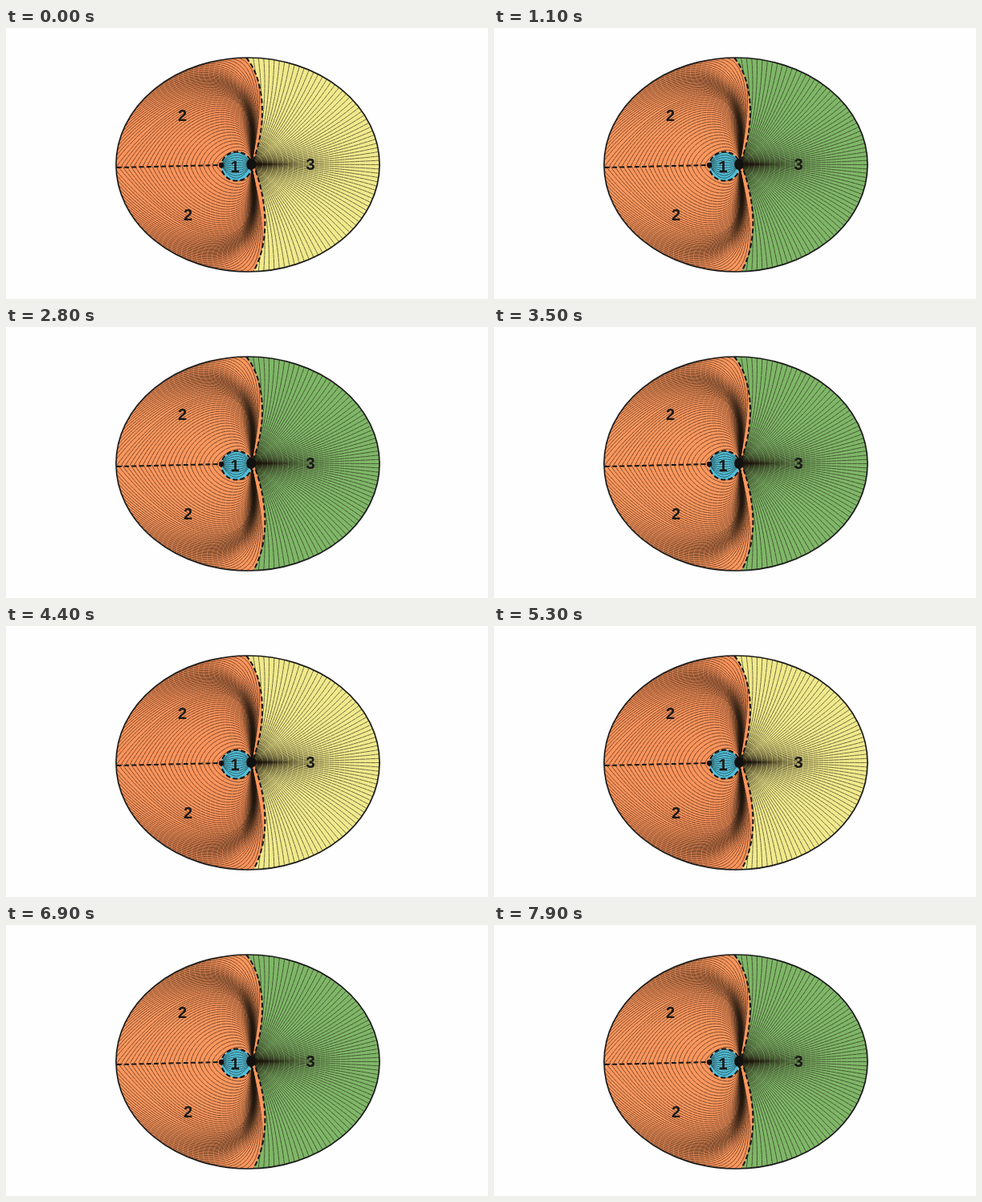
An HTML page for the animation above (8000 ms loop, 600x338 px).

```html
<!DOCTYPE html>
<html lang="en">
<head>
<meta charset="utf-8">
<title>Three flow regions</title>
<style>
  html, body { margin: 0; width: 100%; height: 100%; overflow: hidden; background: #fefefe; }
  svg { display: block; width: 100vw; height: 100vh; }
  path, ellipse { fill: none; }
  .flow { stroke: #20180f; stroke-width: .62; stroke-dasharray: 6 .4; }
  .edge { stroke: #151515; stroke-width: 2; stroke-dasharray: 6 3.2; }
  text { font: bold 20px "Liberation Sans", Arial, sans-serif; fill: #1c1a18; text-anchor: middle; }
</style>
</head>
<body>
<svg viewBox="0 0 600 338">
  <defs>
    <clipPath id="body"><ellipse cx="301" cy="170.5" rx="164" ry="133.5"/></clipPath>
    <clipPath id="left"><path d="M299 30V37C319 60 328 112 307 168C322 205 332 260 308 304V310H130V30Z"/></clipPath>
    <clipPath id="core"><ellipse cx="287" cy="172.5" rx="19" ry="18"/></clipPath>
  </defs>
  <g clip-path="url(#body)">
    <rect id="right" x="130" y="30" width="340" height="280"/>
    <g id="fan" class="flow"></g>
    <g clip-path="url(#left)">
      <rect id="lobes" x="130" y="30" width="200" height="280"/>
      <g id="arches" class="flow"></g>
    </g>
    <path class="edge" d="M299 37C319 60 328 112 307 168C322 205 332 260 308 304"/>
    <path class="edge" d="M138 174L267 171"/>
  </g>
  <g clip-path="url(#core)">
    <rect x="266" y="152" width="42" height="42" fill="#4fbfda"/>
    <g id="lens" class="flow"></g>
  </g>
  <ellipse class="edge" cx="287" cy="172.5" rx="19" ry="18"/>
  <ellipse cx="301" cy="170.5" rx="164" ry="133.5" stroke="#1c1c1c" stroke-width="1.7"/>
  <circle cx="268" cy="171" r="3.2" fill="#111"/>
  <ellipse cx="305" cy="170" rx="5.8" ry="7" style="fill:#111"/>
  <text x="285" y="180">1</text>
  <text x="219.5" y="116">2</text>
  <text x="226.5" y="240">2</text>
  <text x="379" y="176.5">3</text>
</svg>
<script>
const $ = id => document.getElementById(id);
const LOOP = 8000, STEP = 100;
const AXIS = 171.5;
const NODE = [306, 167];
const SWITCHES = [800, 3800, 6800];
const COLOURS = [["#f0ea8c", "#ff945b"], ["#7fb768", "#ff975d"]];

function addPath(group, d) {
  const path = document.createElementNS("http://www.w3.org/2000/svg", "path");
  path.setAttribute("d", d);
  group.append(path);
}

const rim = deg => {
  const a = deg * Math.PI / 180;
  return [301 + 164 * Math.cos(a), 170.5 + 133.5 * Math.sin(a)];
};

const quad = (a, b, c, u) =>
  a.map((v, i) => (1 - u) ** 2 * v + 2 * u * (1 - u) * b[i] + u * u * c[i]);

// A line from the rim or the axis, over a midpoint, down to the node
const ON_RIM = .58;
function arch(u, lower) {
  const start = u < ON_RIM
    ? rim(-95 - 85 * u / ON_RIM)
    : [138 + 124 * (u - ON_RIM) / (1 - ON_RIM), AXIS];
  const mid = quad([314, 66], [211, 44], [285, 153], u);
  const h2 = quad([324, 80], [324, -39], [302, 140], u);
  const h1 = mid.map((m, i) => (m - (start[i] + NODE[i]) / 8) / .375 - h2[i]);
  const points = [start, h1, h2, NODE].map(([x, y]) =>
    lower ? [x + (AXIS - y) * .04, 2 * AXIS - y] : [x, y]);
  return "M" + points[0] + "C" + points.slice(1).join(" ");
}

function ray(deg) {
  const [x, y] = rim(deg);
  const dx = x - 307, dy = y - 170;
  const s = Math.abs(Math.sin(deg * Math.PI / 180));
  const cx = 307 + .48 * dx + 13 * s * s;
  const cy = 170 + dy * (.08 + .38 * s);
  return `M307 170Q${cx} ${cy} ${x} ${y}`;
}

const ARCHES = 56, RAYS = 78;
for (let i = 0; i < ARCHES; i++) {
  const u = i / (ARCHES - 1);
  addPath($("arches"), arch(u, false));
  addPath($("arches"), arch(u, true));
}
for (let i = 0; i <= RAYS; i++) addPath($("fan"), ray(-90 + 180 * i / RAYS));
for (let i = -5; i <= 5; i++) addPath($("lens"), `M268 171Q287 ${172 + i * 6.4} 305 170`);

function draw(now) {
  const time = now % LOOP;
  const state = SWITCHES.filter(t => time >= t).length % 2;
  const [right, lobes] = COLOURS[state];
  $("right").setAttribute("fill", right);
  $("lobes").setAttribute("fill", lobes);
  // Fine gaps drift along the lines
  const shift = -Math.floor(time / STEP) * 1.6;
  for (const id of ["fan", "arches", "lens"]) $(id).style.strokeDashoffset = shift;
}

const begin = performance.now();
function tick() {
  draw(performance.now() - begin);
  requestAnimationFrame(tick);
}
tick();
</script>
</body>
</html>
```
